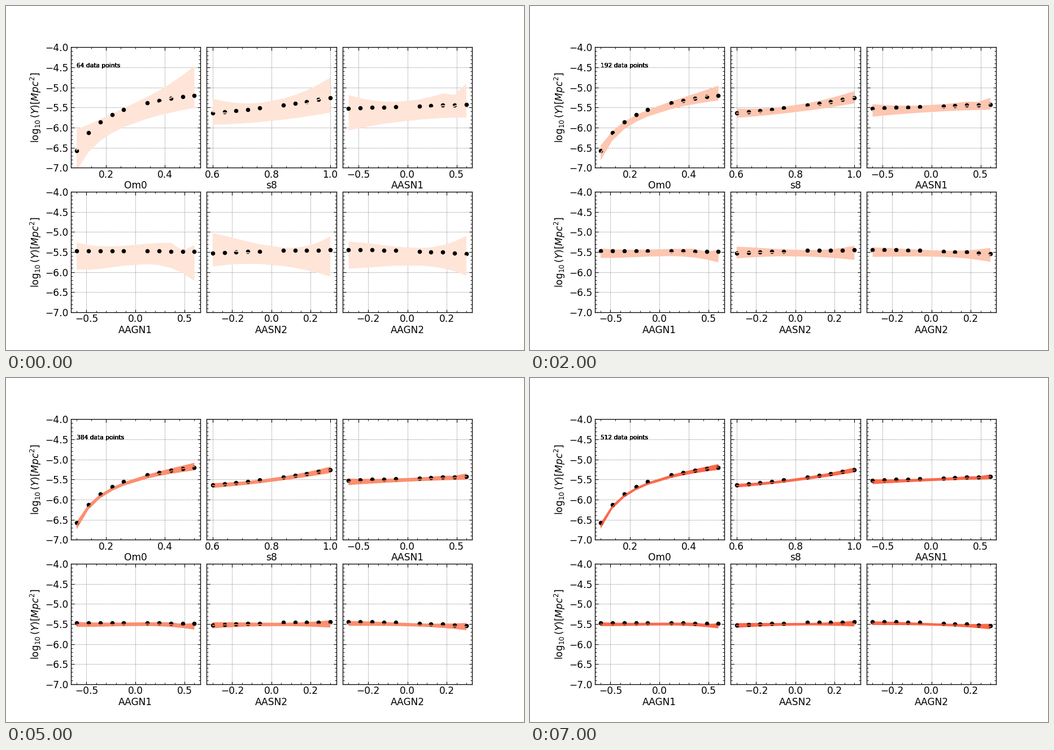
Recreate the animation shown at these times as a matplotlib script. Size 917 by 611 pixels, loop 8000 ms.

```python
import matplotlib.pyplot as plt
import numpy as np
from matplotlib.animation import FuncAnimation
from matplotlib.ticker import AutoMinorLocator, MultipleLocator

PX = 0.72  # points per pixel at 100 dpi
STEPS = 8
COLORS = plt.get_cmap("Reds")(np.linspace(0.1, 0.5, STEPS))

# Eleven-point design without its midpoint, scaled to [-1, 1]
U = np.delete(np.linspace(-1, 1, 11), 5)
KNEE = ((1 - U) / 2) ** 12
NOTCH = np.isclose(U, 0.8)

plt.rcParams.update({
    "font.family": "DejaVu Sans",
    "font.size": 17 * PX,
    "axes.linewidth": 1.3 * PX,
    "axes.labelpad": 4.2 * PX,
    "axes.axisbelow": True,
    "xtick.direction": "in",
    "ytick.direction": "in",
    "xtick.top": True,
    "ytick.right": True,
})

fig, axes = plt.subplots(2, 3, figsize=(9.17, 6.11), dpi=100)
fig.subplots_adjust(left=0.125, right=0.9, bottom=0.11, top=0.88,
                    wspace=0.05, hspace=0.2)
slots = iter(axes.flat)
panels = []


def poly(*coefs):
    """Polynomial in U, constant term first."""
    return np.polyval(coefs[::-1], U)


def style(ax, name, step):
    ax.set_ylim(-7, -4)
    ax.set_xlabel(name, labelpad=1.5 * PX)
    ax.xaxis.set_major_locator(MultipleLocator(step))
    ax.yaxis.set_major_locator(MultipleLocator(0.5))
    ax.xaxis.set_minor_locator(AutoMinorLocator())
    ax.yaxis.set_minor_locator(AutoMinorLocator())
    ax.tick_params(which="major", length=5.5 * PX, width=1.1 * PX, pad=3.7 * PX)
    ax.tick_params(which="minor", length=3 * PX, width=0.9 * PX)
    ax.grid(color="black", alpha=0.5, ls="--", lw=0.62 * PX)
    if ax.get_subplotspec().is_first_col():
        ax.set_ylabel(r"$\log_{10}(Y)[Mpc^2]$")
    else:
        ax.tick_params(labelleft=False)


def add_panel(name, mid, half, step, depth, top, bottom, lag=2):
    """Depth is -100 y; top, bottom and lag are offsets from it."""
    ax = next(slots)
    x = mid + half * U
    style(ax, name, step)
    ax.set_xlim(mid - 1.1 * half, mid + 1.1 * half)
    band, = ax.fill([0, 0, 0], [0, 0, 0], lw=0, zorder=1)
    ax.plot(x, -depth / 100, "o", color="black", ms=7.6 * PX, mew=0, zorder=2)
    line, = ax.plot(x, -depth / 100, lw=1.7 * PX, zorder=3)
    panels.append((x, depth, top, bottom, lag, band, line))


add_panel("Om0", 0.3, 0.2, 0.2, 467.8 + 30 * (0.3 + 0.2 * U) ** -0.8,
          poly(-8, -28, -37) - 36 * KNEE, poly(41, -10), 2 + 8 * KNEE)
add_panel("s8", 0.8, 0.2, 0.2, poly(547.6, -19.3, -2.7),
          poly(-13, -7, -30), poly(36, 4, -3))
add_panel("AASN1", 0, 0.6, 0.5, poly(547.2, -4.6, 0.4),
          poly(-13, -10, -30) + 15 * NOTCH, poly(36, -11.5, 7.5))
add_panel("AAGN1", 0, 0.6, 0.5, poly(547.2, 1, 0.8),
          poly(-15, -14, -3, 16) + 18 * NOTCH, poly(34, -12, 26, 25))
add_panel("AASN2", 0, 0.3, 0.2, poly(547.4, -4, 1.8),
          poly(-11, 26, -31, -18), poly(34.5, 16.5, 15))
add_panel("AAGN2", 0, 0.3, 0.2, poly(547.4, 4.7, 1.8),
          poly(-8, 4, -24, -16), poly(36, -6, 15, 10))

# Stacked copies give the label its heavy edges
labels = [axes[0, 0].text(0.1, -4.5, "", fontsize=10.65 * PX, zorder=4)
          for _ in panels]


def update(i):
    shrink = (i + 1) ** -0.95
    for x, depth, top, bottom, lag, band, line in panels:
        upper, lower = (-(depth + lag + shrink * (edge - lag)) / 100
                        for edge in (top, bottom))
        band.set_xy(np.column_stack([np.append(x, x[::-1]),
                                     np.append(upper, lower[::-1])]))
        band.set_facecolor(COLORS[i])
        line.set_ydata((upper + lower) / 2)
        line.set_color(COLORS[i])
    for label in labels:
        label.set_text(f"{64 * (i + 1)} data points")
    return []


anim = FuncAnimation(fig, update, frames=STEPS, interval=1000,
                     repeat=True, repeat_delay=0)
plt.show()
```
